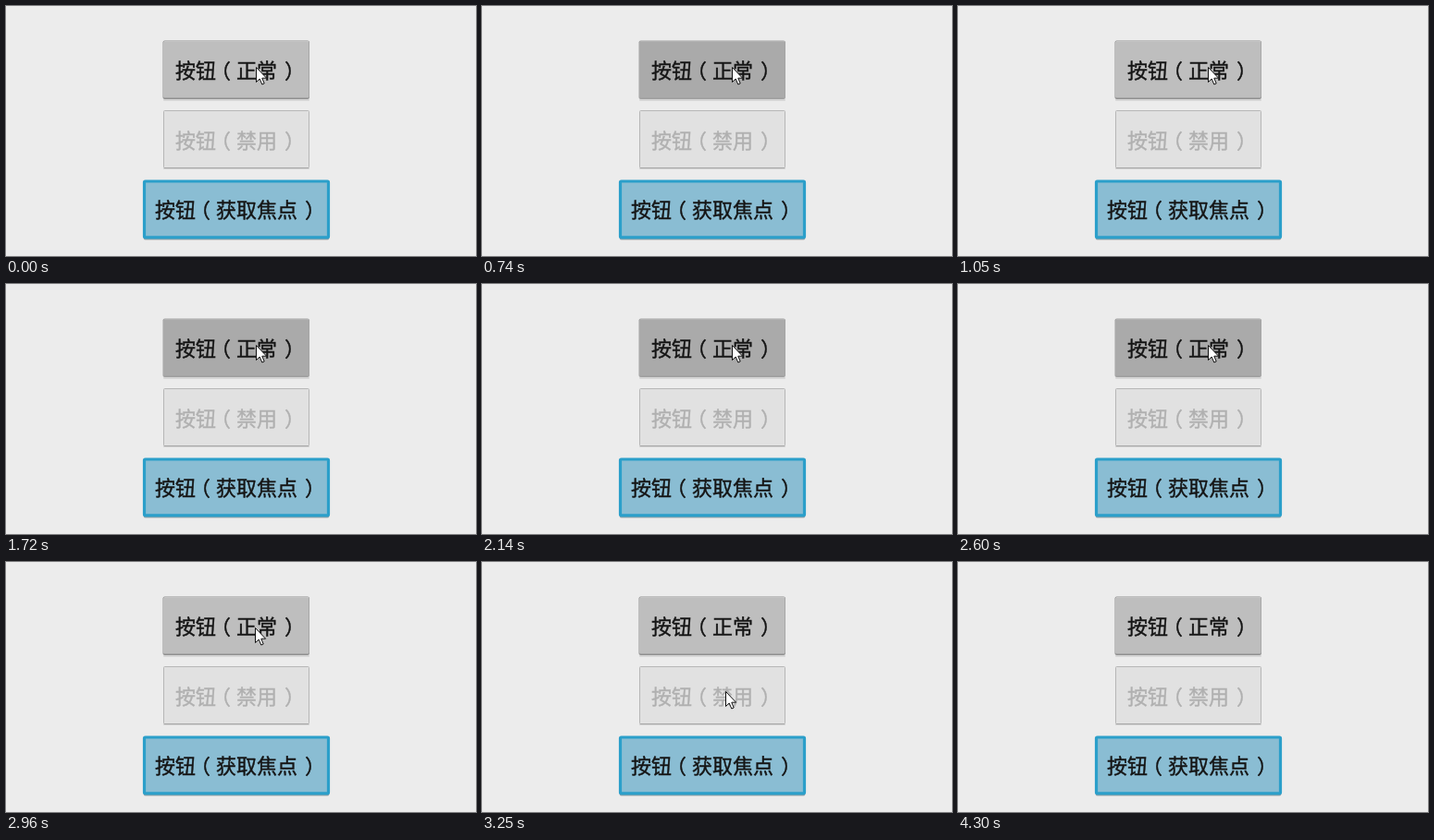
Recreate the animation shown at these times as an HTML page. Size 508 by 271 pixels, loop 5100 ms.

```html
<!DOCTYPE html>
<html lang="zh-CN">
<head>
<meta charset="utf-8">
<title>按钮</title>
<style>
  html, body { margin: 0; height: 100%; overflow: hidden; background: #ececec; }
  svg { display: block; width: 508px; height: 271px; }
  text { font: 22px "Noto Sans CJK SC", "Noto Sans CJK", sans-serif; fill: #151515; stroke: #151515; stroke-width: .4px; }
  .disabled { fill: #b0b0b0; stroke: #b0b0b0; }
</style>
</head>
<body>
<svg viewBox="0 0 508 271">
  <rect x="170" y="101" width="158" height="2" rx="1" fill="#d6d6d6"/>
  <rect id="edge" x="169.5" y="37.5" width="158.5" height="63.5" rx="2"/>
  <rect id="face" x="170" y="38" width="157.5" height="61.5" rx="1.5"/>
  <path id="shine" d="M171 38.5H327"/>
  <text x="183" y="77.7">按钮<tspan dx="-6">（</tspan><tspan dx="6">正常</tspan><tspan dx="8">）</tspan></text>

  <rect x="170" y="175" width="158" height="2" rx="1" fill="#d0d0d0"/>
  <rect x="170.5" y="113.5" width="157" height="62" rx="1" fill="#e1e1e1" stroke="#b6b6b6"/>
  <path d="M171 175.5H327" stroke="#a8a8a8"/>
  <text class="disabled" x="183" y="153.7">按钮<tspan dx="-6">（</tspan><tspan dx="6">禁用</tspan><tspan dx="8">）</tspan></text>

  <rect x="149" y="251" width="200" height="2.6" rx="1.5" fill="#98a2a6"/>
  <rect x="149.5" y="190" width="199" height="60.8" rx="1" fill="#8abdd3" stroke="#2b9fca" stroke-width="3.2"/>
  <text x="161" y="228.7">按钮<tspan dx="-6">（</tspan><tspan dx="6">获取焦点</tspan><tspan dx="8">）</tspan></text>

  <path id="cursor" d="M.5 .5V16.5L4.2 13 6.8 19 9.2 18 6.8 12.2H11.6Z" fill="#fff" stroke="#111"/>
</svg>
<script>
const LOOP = 5100;
const presses = [[740, 1050], [1720, 1960], [2140, 2200], [2370, 2430], [2600, 2720]];
const [edge, face, shine, cursor] =
  ['edge', 'face', 'shine', 'cursor'].map(id => document.getElementById(id));

// Number of discrete moves made since `start`
const stepsSince = (t, start, gap, count) =>
  Math.max(0, Math.min(count, Math.floor((t - start) / gap) + 1));

function cursorAt(t) {
  const down = stepsSince(t, 2960, 58, 6) / 6;
  const away = stepsSince(t, 4060, 60, 5);
  if (away === 5) return [600, 400];
  const ease = down * down * (3 - 2 * down);
  const exit = (away / 4) ** 1.4;
  return [270 - 7 * ease + 144 * exit, 66 + 74 * ease + 112 * exit];
}

function draw(now) {
  const t = now % LOOP;
  const pressed = presses.some(([from, to]) => t >= from && t < to);
  edge.setAttribute('fill', pressed ? '#a0a0a0' : '#909090');
  face.setAttribute('fill', pressed ? '#aaa' : '#bebebe');
  shine.setAttribute('stroke', pressed ? '#b2b2b2' : '#c4c4c4');
  cursor.setAttribute('transform', `translate(${cursorAt(t).map(Math.round)})`);
  requestAnimationFrame(draw);
}
draw(performance.now());
</script>
</body>
</html>
```
